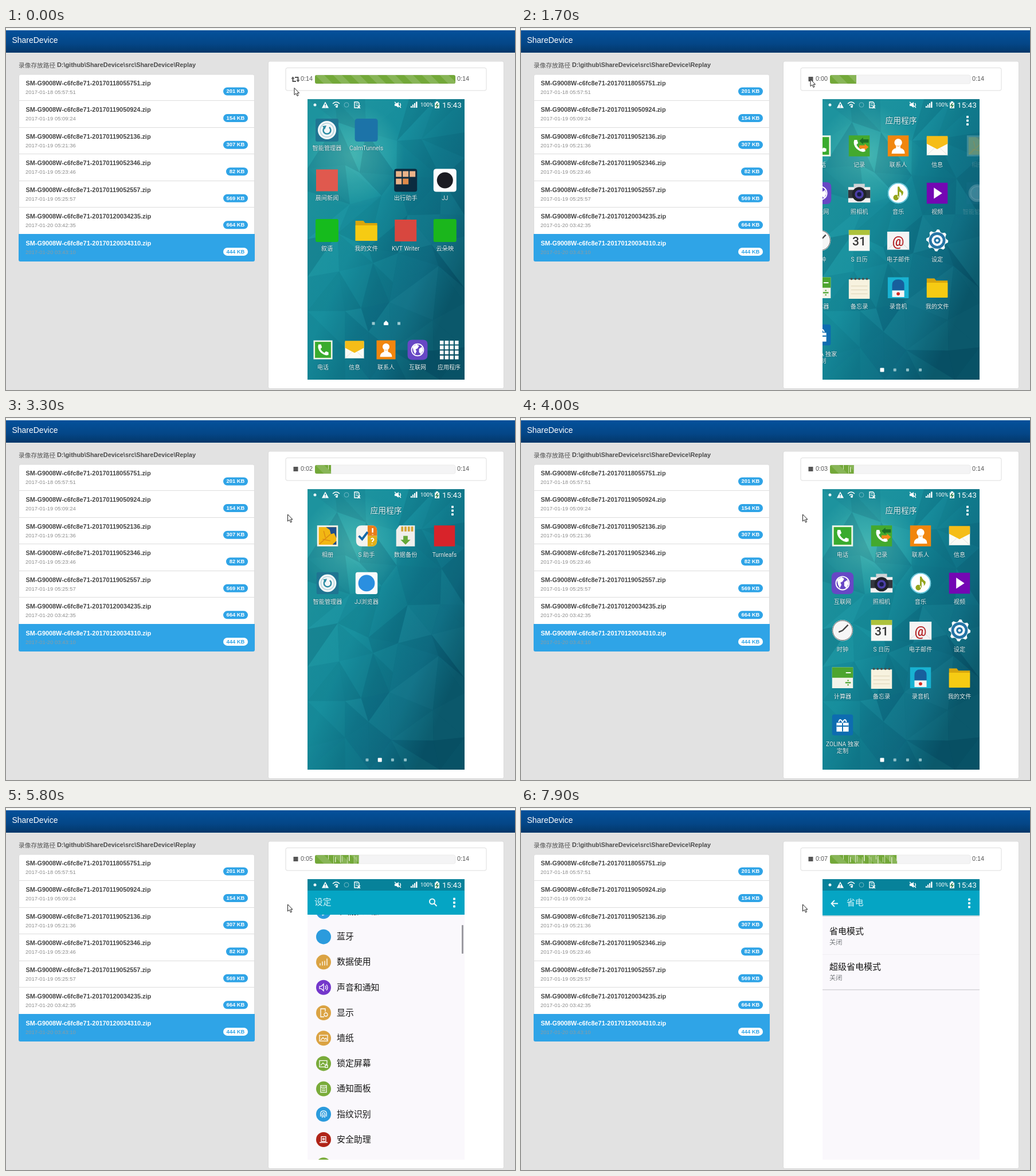
Write an HTML page with a canvas that moves like this. It is 888x631 px and loops after 8000 ms.

```html
<!DOCTYPE html>
<html lang="zh">
<head>
<meta charset="utf-8">
<title>ShareDevice</title>
<style>
  html, body { margin: 0; width: 100%; height: 100%; overflow: hidden; background: #e2e2e2; }
  canvas { display: block; }
</style>
</head>
<body>
<canvas id="stage" width="888" height="631"></canvas>
<script>
const ctx = document.getElementById("stage").getContext("2d");
const CJK = '"Noto Sans CJK SC", "Noto Sans CJK", sans-serif';
const ARIAL = '"Liberation Sans", ' + CJK;
const PHONE = "Roboto, " + CJK;
const LOOP = 8000, STEP = 100;

// ---------- helpers ----------
const clamp = (v, lo = 0, hi = 1) => Math.min(hi, Math.max(lo, v));

// Linear interpolation through [time, value] pairs
function track(t, keys) {
  if (t <= keys[0][0]) return keys[0][1];
  for (let i = 1; i < keys.length; i++) {
    const [t0, v0] = keys[i - 1], [t1, v1] = keys[i];
    if (t <= t1) return v0 + (v1 - v0) * (t - t0) / (t1 - t0);
  }
  return keys[keys.length - 1][1];
}

function rect(x, y, w, h, fill) {
  ctx.fillStyle = fill;
  ctx.fillRect(x, y, w, h);
}

function round(x, y, w, h, r, fill, stroke) {
  ctx.beginPath();
  ctx.roundRect(x, y, w, h, r);
  if (fill) { ctx.fillStyle = fill; ctx.fill(); }
  if (stroke) { ctx.strokeStyle = stroke; ctx.lineWidth = 1; ctx.stroke(); }
}

function gradient(x0, y0, x1, y1, stops) {
  const g = ctx.createLinearGradient(x0, y0, x1, y1);
  stops.forEach(([at, color]) => g.addColorStop(at, color));
  return g;
}

function text(str, x, y, size, color, { align = "left", weight = "", font = PHONE } = {}) {
  ctx.font = `${weight} ${size}px ${font}`;
  ctx.textAlign = align;
  ctx.textBaseline = "middle";
  ctx.fillStyle = color;
  ctx.fillText(str, x, y);
}

function clipped(x, y, w, h, draw) {
  ctx.save();
  ctx.beginPath();
  ctx.rect(x, y, w, h);
  ctx.clip();
  draw();
  ctx.restore();
}

function label(str, x, y, size = 10.2) {
  ctx.shadowColor = "rgba(0,40,50,.7)";
  ctx.shadowBlur = 2;
  text(str, x, y, size, "#e6f3f4", { align: "center" });
  ctx.shadowBlur = 0;
}

// ---------- icons: layers of [colour, path or text, line width or text size] ----------
const box = (x, y, w, h) => `M${x} ${y}h${w}v${h}h${-w}z`;
const disc = (r, x = 0, y = 0) => `M${x - r} ${y}a${r} ${r} 0 1 0 ${2 * r} 0a${r} ${r} 0 1 0 ${-2 * r} 0z`;
const tile = (a, r) => `M${r - a} ${-a}H${a - r}Q${a} ${-a} ${a} ${r - a}V${a - r}Q${a} ${a} ${a - r} ${a}H${r - a}Q${-a} ${a} ${-a} ${a - r}V${r - a}Q${-a} ${-a} ${r - a} ${-a}Z`;
const square = box(-19, -19, 38, 38);
const handset = "M-9-11L-4-11L-2-5L-5-2Q-2 4 3 6L6 3L11 5V10Q4 13-5 5Q-12-3-9-11Z";
const gear = "M" + Array.from({ length: 32 }, (_, i) => {
  const r = i % 4 < 2 ? 20 : 16, a = i * Math.PI / 16;
  return `${(r * Math.cos(a)).toFixed(1)} ${(r * Math.sin(a)).toFixed(1)}`;
}).join("L") + "Z";

const art = {
  manager: [["#1f7592", tile(20, 3)], ["#f2f7f8", disc(16)], ["#b4d3da", disc(12), 1.5], ["#2b8ba2", "M-4-5A6.5 6.5 0 1 0 4-5", 2.5], ["#2b8ba2", "M-1-8L-8-7L-4-1Z"]],
  tunnel: [["#1c73a8", tile(20, 5)]],
  news: [["#e0594e", square]],
  travel: [["#0b2b3f", tile(20, 4)], ["#eab389", box(-17, -16, 10, 10) + box(-5, -16, 10, 10) + box(7, -16, 10, 10) + box(-17, -3, 10, 10)], ["#df8a4a", box(-5, -3, 10, 10)]],
  messenger: [["#fdfdfd", tile(20, 5)], ["#1c1c22", disc(14)]],
  chat: [["#16bb1d", tile(20, 3)]],
  files: [["#d9a60c", "M-19-17H-5L-2-13H19V17H-19Z"], ["#f6cb13", box(-19, -9, 38, 27)]],
  writer: [["#d8473f", square]],
  film: [["#1bb61c", tile(20, 3)]],
  phone: [["#eef6e8", square], ["#3aab2e", box(-16, -16, 32, 32)], ["#fff", handset]],
  message: [["#fbfbf6", box(-19, -16, 38, 33)], ["#f5bd18", "M-19-18H19V-4L0 6L-19-4Z"], ["#e0e0da", "M-19 17L-5 4M19 17L5 4", 1]],
  contacts: [["#f1860e", square], ["#fff", disc(7, 0, -6) + "M-12 14Q-12 6-4 4V0H4V4Q12 6 12 14Z"]],
  web: [["#6747c5", tile(20, 9)], ["#fff", disc(12), 2], ["#fff", "M-10-6L-2-11L3-8L0-3L-4-1L-2 3L-5 9L-8 3ZM3-2L9-6L11 1L7 9L3 5Z"]],
  apps: [["#fff", [0, 1, 2, 3].flatMap(i => [0, 1, 2, 3].map(j => box(-18.5 + i * 10, -18.5 + j * 10, 7.5, 7.5))).join("")]],
  log: [["#43a92e", square], ["#fff", handset], ["#1b6f24", "M0-9L7-15V-12H17V-6H7V-3Z"], ["#f48a19", "M17 2L10-4V-1H0V5H10V8Z"]],
  camera: [["#f1f1f1", box(-20, -11, 40, 28)], ["#d0d3d6", box(-10, -17, 20, 7)], ["#33373f", box(-20, -6, 40, 15)], ["#20242b", disc(13, 0, 2)], ["#4b3fa8", disc(8, 0, 2)], ["#171b45", disc(4, 0, 2)]],
  music: [["#fff", disc(19)], ["#4fc0d9", disc(18), 1.5], ["#94a51d", disc(5, -4, 8) + "M-1 8V-12H2Q3-7 9-3Q10 2 6 5Q7-1 2-3V8Z"]],
  video: [["#7407b3", square], ["#fff", "M-6-10L9 0L-6 10Z"]],
  clock: [["#f6f6f6", disc(19)], ["#555", disc(18), 1], ["#444", "M0 0L10-10M0 0L-7 3", 2.5]],
  calendar: [["#f8f8f5", square], ["#adc23b", box(-19, -19, 38, 9)], ["#333", "31", 22]],
  email: [["#f4f4f4", box(-20, -16, 40, 33)], ["#d6d6d6", "M-20 17L-6 4M20 17L6 4", 1], ["#b42224", "@", 24]],
  settings: [["#f5fafb", gear], ["#2474a5", disc(15)], ["#fff", disc(10)], ["#2474a5", disc(6)], ["#fff", disc(2.5)]],
  calculator: [["#f3f4ea", square], ["#4da52f", box(-19, -19, 38, 19)], ["#fff", "M6-9H15", 2], ["#4da52f", "M5 9H15M10 4V6M10 12V14", 2.5]],
  memo: [["#f7f2df", box(-19, -15, 38, 35)], ["#ddd3b4", "M-15-3H15M-15 4H15M-15 11H15", 1], ["#4a4d4a", [-14, -7, 0, 7, 14].map(x => disc(2, x, -16)).join("")]],
  recorder: [["#18b2d2", square], ["#175f9d", "M-11-5Q-11-15 0-15Q11-15 11-5V5H-11Z"], ["#f4f4f4", box(-11, 5, 22, 12)], ["#d32a23", disc(3, 0, 11)]],
  gift: [["#0d6cb0", tile(19, 4)], ["#fff", box(-11, -4, 22, 16)], ["#0d6cb0", "M0-4V12M-11 2H11", 2], ["#fff", "M-7-5Q-5-14 0-5Q5-14 7-5", 2]],
  gallery: [["#f4f3e9", square], ["#f2b713", box(-16, -16, 32, 32)], ["#1f4f8d", "M-3-16H16V4L12-5L6-3L4-11ZM16 9V16H9Z"], ["#dc8b12", "M-15 15L5-3M-9 6L5 9M-4 3L-7-9", 1.5]],
  assistant: [["#f3f3f0", tile(19, 10)], ["#eb7d18", "M2-19H10Q19-19 19-9V0H2Z"], ["#e3b018", "M2 0H19V9Q19 19 10 19H2Z"], ["#1469a9", "M-14 0L-8 6L2-7", 4], ["#fff", "M11-14V-6M11-3V-2", 2.5], ["#fff", "M8 6Q12 2 13 7L10 11M10 14V15", 2]],
  backup: [["#efefec", "M-11-19H17V19H-17V-11Z"], ["#d2a536", box(-8, -17, 4, 9) + box(-2, -17, 4, 9) + box(4, -17, 4, 9) + box(10, -17, 4, 9)], ["#65a938", "M-4 0H4V7H9L0 16L-9 7H-4Z"]],
  reader: [["#d8232a", square]],
  browser: [["#f9fbfc", tile(20, 4)], ["#2a8fe0", disc(15)]]
};

// White line glyphs of the settings rows
const glyphs = {
  wifi: "M-8-3Q0-9 8-3M-5 0Q0-4 5 0M-2 3Q0 1 2 3M0 5V6",
  bolt: "M2-7L-4 0H3L-2 7M-2 7L-2 3M-2 7L2 5",
  bars: "M-6 6V2M-2 6V-1M2 6V-2M6 6V-6",
  sound: "M-7-2H-4L0-6V6L-4 2H-7ZM3-3Q5 0 3 3M5-5Q9 0 5 5",
  display: "M3-2V-7H-5V7H1" + disc(3, 4, 3),
  picture: "M-7-5H7V5H-7ZM-5 3L-1-1L2 2L4 0L6 3",
  lock: "M3 6H-7V-5H6V0M-5 3L-1-1L2 2M3 3H7V7H3ZM4 3V1H6V3",
  notes: "M-5-6H5V6H-5ZM-5-3H5M-3 0H3M-3 3H3",
  finger: "M-5 4Q-7-6 0-6Q7-6 5 4M-2 6Q-4-3 0-3Q4-3 2 6M0 0V5",
  alarm: "M-4 3V-5H4V3ZM-7 5H7M0-3V1M-3-1H3",
  power: "M-4-5H4V6H-4ZM-1-7H1M1-2L-2 1H2L-1 4",
  share: "M-6-3H1V7H-6ZM2-4Q5-4 5 0M2-7Q8-7 8 0",
  plane: "M-7-5L7 4M-1-1L6-5M-1-1L-4 6"
};

const paths = {};
const path = d => paths[d] ||= new Path2D(d);

function layers(list, x, y, scale = 1) {
  ctx.save();
  ctx.translate(x, y);
  ctx.scale(scale, scale);
  for (const [color, shape, size] of list) {
    if (shape[0] !== "M") {
      text(shape, 0, 3, size, color, { align: "center", weight: "500" });
    } else if (size) {
      ctx.strokeStyle = color;
      ctx.lineWidth = size;
      ctx.stroke(path(shape));
    } else {
      ctx.fillStyle = color;
      ctx.fill(path(shape));
    }
  }
  ctx.restore();
}

// ---------- web page ----------
const recordings = [
  ["20170118055751", "201 KB"], ["20170119050924", "154 KB"], ["20170119052136", "307 KB"],
  ["20170119052346", "82 KB"], ["20170119052557", "569 KB"], ["20170120034235", "664 KB"],
  ["20170120034310", "444 KB"]
];

function drawPage() {
  rect(0, 0, 888, 631, "#e2e2e2");
  rect(0, 0, 888, 4, "#f6f6f4");
  rect(0, 4, 888, 39, gradient(0, 4, 0, 43, [[0, "#04519b"], [.6, "#044687"], [1, "#033769"]]));
  text("ShareDevice", 10.5, 22.5, 13.97, "#fff", { font: ARIAL });
  text("录像存放路径", 22, 65, 10.7, "#555", { font: CJK });
  text("D:\\github\\ShareDevice\\src\\ShareDevice\\Replay", 89, 65, 10.86, "#4c4c4c", { font: ARIAL, weight: "bold" });

  round(22.5, 81, 411, 325.5, 3, "#fff", "#dcdcdc");
  recordings.forEach(([id, size], i) => {
    const y = 80.5 + i * 46.57, active = i === 6;
    if (active) round(22, 359, 412, 48, [0, 0, 3, 3], "#2fa4e7");
    else if (i < 5) rect(22, Math.floor(y + 46), 412, 1, "#ddd");
    const date = id.replace(/(....)(..)(..)(..)(..)(..)/, "$1-$2-$3 $4:$5:$6");
    text(`SM-G9008W-c6fc8e71-${id}.zip`, 34.5, y + 16, 10.88, active ? "#fff" : "#444", { font: ARIAL, weight: "bold" });
    text(date, 34, y + 31.5, 9.45, active ? "#8a9ca3" : "#8c8c8c", { font: ARIAL });
    const w = size.length > 5 ? 43 : 38;
    round(422 - w, y + 23, w, 14, 7, active ? "#fff" : "#2fa4e7");
    text(size, 422 - w / 2, y + 30.2, 9.4, active ? "#2fa4e7" : "#fff", { font: ARIAL, weight: "bold", align: "center" });
  });

  round(457.5, 58, 411, 570.5, 3, "#fff", "#dadada");
  round(488, 69.5, 350, 39.5, 3, "#fff", "#ddd");
}

function drawPlayer(t) {
  const playing = t >= 1400;
  const drop = 244 * (1 - clamp((t - 1390) / 600)) ** 2.3;
  const width = playing ? Math.max(drop, (t - 1850) * .01935) : 245;
  const seconds = playing ? Math.max(0, Math.round((t - 1550) * .0011)) : 14;

  if (playing) rect(501.5, 85, 8, 8, "#555");
  else layers([["#555", "M500.5 88V93H506M509.5 91V86H504", 2], ["#555", "M497.5 88.5L500.5 84.5L503.5 88.5ZM506.5 90.5L509.5 94.5L512.5 90.5Z"]], 0, 0);
  text(`0:${String(seconds).padStart(2, "0")}`, 514, 89.5, 10.86, "#555", { font: ARIAL });
  text("0:14", 787, 89.5, 10.86, "#555", { font: ARIAL });

  round(539.5, 82, 244.5, 15, 3, "#f4f4f5", "#ebebeb");
  ctx.save();
  ctx.beginPath();
  ctx.roundRect(539, 82, 245, 15, 3);
  ctx.clip();
  clipped(539, 81, width, 17, () => {
    rect(539, 81, 245, 17, "#73a839");
    for (let x = 539; x < 784; x += 31) layers([["#88b557", "M0 0H15.5L31.5 16H16Z"]], x, 81.5);
    // Thin gaps left in the bar while it grows
    if (t > 2000) for (let i = 0; i < 16; i++) {
      const x = 562 + i * 6 + (i * i * 7) % 4;
      rect(x, 81.5 + (i % 3) * 2, i % 4 === 2 ? 1.5 : .8, 8 + (i * 5) % 9, i % 3 ? "#d9e8c4" : "#f2f5e8");
    }
  });
  ctx.restore();
}

// ---------- phone ----------
const X = 526, Y = 124, W = 274, H = 489;
const noise = n => { const s = Math.sin(n * 127.1) * 43758.5453; return s - Math.floor(s); };

function corner(i, j) {
  const edge = (k, max, n) => k <= 0 || k >= max ? 0 : (noise(n) - .5) * .8;
  return [X + (i + edge(i, 5, i * 9 + j + 3)) * W / 5, Y + (j + edge(j, 8, i * 5 + j * 11 + 7)) * H / 8];
}

function drawWallpaper() {
  rect(X, Y, W, H, gradient(526, 300, 800, 420,
    [[0, "#1d929d"], [.35, "#168c9b"], [.57, "#0f7689"], [.78, "#0e6a80"], [1, "#075064"]]));
  const glow = ctx.createRadialGradient(605, 222, 5, 605, 222, 90);
  glow.addColorStop(0, "rgba(100,205,190,.55)");
  glow.addColorStop(1, "rgba(100,205,190,0)");
  rect(X, Y, W, H, glow);
  for (let i = 0; i < 5; i++) for (let j = 0; j < 8; j++) {
    const a = corner(i, j), b = corner(i + 1, j), c = corner(i, j + 1), d = corner(i + 1, j + 1);
    const halves = noise(i + j * 6) > .5 ? [[a, b, c], [b, d, c]] : [[a, b, d], [a, d, c]];
    halves.forEach((tri, k) => {
      const shade = noise(i * 31 + j * 17 + k * 5 + 1) - .5;
      ctx.fillStyle = shade > 0 ? `rgba(70,205,210,${shade * .2})` : `rgba(0,55,80,${-shade * .28})`;
      ctx.beginPath();
      tri.forEach(p => ctx.lineTo(...p));
      ctx.fill();
    });
  }
}

function drawStatus() {
  layers([
    ["#e8f6f8", disc(2.5, 539, 134)],
    ["#fff", "M557 128.5L563 139.5H551Z"],
    ["#0b7f94", "M557 132V135.5M557 137V138", 1.5],
    ["#fff", "M570 132Q576 126 582 132M573 135Q576 131 579 135", 1.6],
    ["#fff", disc(2, 577, 137)],
    ["#6fb7c2", disc(4, 594, 134), 1],
    ["#fff", "M608 129H614L616 131V139H608Z", 1.4],
    ["#fff", "M610 132H614M610 135H613M613 135L618 140M618 135L613 140", 1.2],
    ["#fff", "M678 132H681L685 129V139L681 136H678Z"],
    ["#fff", "M678 129L689 139M687 131Q690 134 687 137", 1.3],
    ["#fff", "M706 139H708V136H706ZM709 139H711V133.5H709ZM712 139H714V131H712ZM715 139H717.5V128.5H715Z"],
    ["#fff", "M748 130H750V128H754V130H756V140H748Z"],
    ["#217b42", "M753 131L750 135H754L751 139", 1.3]
  ], 0, 0);
  text("100%", 723, 134.5, 9.3, "#fff");
  text("15:43", 761, 134.5, 13.6, "#fff");
}

function menuDots(x, y) {
  for (const dy of [-6.5, 0, 6.5]) round(x - 2, y + dy - 2, 4, 4, 1, "#eef9fb");
}

const homeApps = [
  ["manager", "智能管理器", 0, 0], ["tunnel", "CalmTunnels", 1, 0],
  ["news", "晨间新闻", 0, 1], ["travel", "出行助手", 2, 1], ["messenger", "JJ", 3, 1],
  ["chat", "叙语", 0, 2], ["files", "我的文件", 1, 2], ["writer", "KVT Writer", 2, 2], ["film", "云朵映", 3, 2]
];
const dock = [["phone", "电话"], ["message", "信息"], ["contacts", "联系人"], ["web", "互联网"], ["apps", "应用程序"]];

function drawHome() {
  drawWallpaper();
  for (const [icon, name, col, row] of homeApps) {
    const x = 560 + col * 68.6, y = 178 + row * 87.5;
    layers(art[icon], x, y);
    label(name, x, y + 31.5);
  }
  dock.forEach(([icon, name], i) => {
    const x = 553 + i * 55;
    layers(art[icon], x, 561, .87);
    label(name, x, 592.5, 10);
  });
  rect(638.5, 512.5, 5, 5, "#9cc9d0");
  rect(683, 512.5, 5, 5, "#9cc9d0");
  layers([["#fff", "M663 510L667 514V518H659V514Z"]], 0, 0);
}

const drawer = [
  [["phone", "电话"], ["log", "记录"], ["contacts", "联系人"], ["message", "信息"],
   ["web", "互联网"], ["camera", "照相机"], ["music", "音乐"], ["video", "视频"],
   ["clock", "时钟"], ["calendar", "S 日历"], ["email", "电子邮件"], ["settings", "设定"],
   ["calculator", "计算器"], ["memo", "备忘录"], ["recorder", "录音机"], ["files", "我的文件"],
   ["gift", "ZOLINA 独家"]],
  [["gallery", "相册"], ["assistant", "S 助手"], ["backup", "数据备份"], ["reader", "Turnleafs"],
   ["manager", "智能管理器"], ["browser", "JJ浏览器"]]
];

function drawDrawer(position) {
  drawWallpaper();
  label("应用程序", 663, 162, 13.8);
  menuDots(779, 161.5);
  drawer.forEach((apps, page) => {
    const shift = page - position;
    ctx.globalAlpha = clamp(1.4 * (1 - Math.abs(shift)));
    apps.forEach(([icon, name], i) => {
      const x = 561 + i % 4 * 68 + shift * W, y = 205.5 + Math.floor(i / 4) * 82.4;
      layers(art[icon], x, y, .96);
      label(name, x, y + 33.5);
      if (icon === "gift") label("定制", x, y + 46);
    });
  });
  ctx.globalAlpha = 1;
  for (let i = 0; i < 4; i++) {
    const on = i === Math.round(position), s = on ? 7 : 5;
    round(630 + i * 22.2 - s / 2, 596 - s / 2, s, s, 1, on ? "#fff" : "#8fc0c8");
  }
}

const BLUE = "#2b9bdd", GOLD = "#dba343", GREEN = "#79ab3a";
const settings = [
  ["快速设置"], ["WLAN", BLUE, "wifi"], ["下载推进器", BLUE, "bolt"], ["蓝牙", BLUE],
  ["数据使用", GOLD, "bars"], ["声音和通知", "#7437cb", "sound"], ["显示", GOLD, "display"],
  ["墙纸", GOLD, "picture"], ["锁定屏幕", GREEN, "lock"], ["通知面板", GREEN, "notes"],
  ["指纹识别", BLUE, "finger"], ["安全助理", "#b02418", "alarm"], ["省电", GREEN, "power"],
  ["网络连接"], ["WLAN", BLUE, "wifi"], ["下载推进器", BLUE, "bolt"], ["蓝牙", BLUE],
  ["网络共享和移动热点", BLUE, "share"], ["飞行模式", GREEN, "plane"]
];

function drawHeader(title, x, bottom) {
  rect(X, Y, W, H, "#faf8fc");
  rect(X, Y, W, 20, "#07829a");
  rect(X, 144, W, bottom - 144, "#05a5c4");
  text(title, x, bottom - 21.5, 14.8, "#d5f2f7");
}

function drawSettings(t) {
  drawHeader("设定", 538, 186);
  if (t < 4500) return;
  layers([["#eef9fb", disc(4.5, 743.5, 163) + "M747 166.5L751.5 171", 2]], 0, 0);
  menuDots(782, 165);

  const scroll = track(t, [[5500, 0], [5800, 111], [6500, 389.5]]);
  clipped(X, 186, W, 427, () => {
    let y = 206 - scroll;
    settings.forEach(([name, color, glyph], i) => {
      if (color) {
        layers([[color, disc(13)]], 554, y);
        if (glyph) layers([["#fff", glyphs[glyph], 1.3]], 554, y);
        text(name, 577, y + .5, 14.9, "#161616");
      } else {
        text(name, 538, y, 12, "#6f7578");
      }
      const next = settings[i + 1];
      y += !color ? 41 : next && !next[1] ? 53 : 44.2;
    });
    if (t >= 5500) round(795, 190 + scroll * .1255, 3, 50, 1, "#9b9aa0");
  });
}

function drawPowerSaving() {
  drawHeader("省电", 568, 187.5);
  layers([["#eef9fb", "M553 166.5H542M547 161L541.5 166.5L547 172", 1.8]], 0, 0);
  menuDots(782, 166);
  rect(X, 187.5, W, 1.5, "#c9d5da");
  [["省电模式", 216], ["超级省电模式", 278]].forEach(([name, y]) => {
    text(name, 538, y, 15, "#161616");
    text("关闭", 538, y + 19, 11.2, "#777b7e");
  });
  rect(X, 255, W, 1, "#f1eff3");
  rect(X, 316, W, 1.5, "#d6d5d9");
}

function drawPhone(t) {
  clipped(X, Y, W, H, () => {
    if (t < 1500) drawHome();
    else if (t < 4200) drawDrawer(track(t, [[1600, 0], [1700, .142], [2000, 1], [3500, 1], [3900, 0]]));
    else if (t < 7500) drawSettings(t);
    else drawPowerSaving();
    drawStatus();
  });
}

function drawPointer(t) {
  const x = track(t, [[700, 503], [1100, 505], [1700, 505], [2200, 491.5]]);
  const y = track(t, [[700, 104.5], [1100, 89.5], [1700, 89.5], [2200, 168]]);
  const arrow = "M0 0V12L3 9.5L5 14L7 13L5 8.8H8.5Z";
  layers([["#fff", arrow], ["#222", arrow, 1]], x, y);
}

function frame(now) {
  const t = Math.floor(now % LOOP / STEP) * STEP;
  drawPage();
  drawPlayer(t);
  drawPhone(t);
  drawPointer(t);
  requestAnimationFrame(frame);
}
requestAnimationFrame(frame);
</script>
</body>
</html>
```
